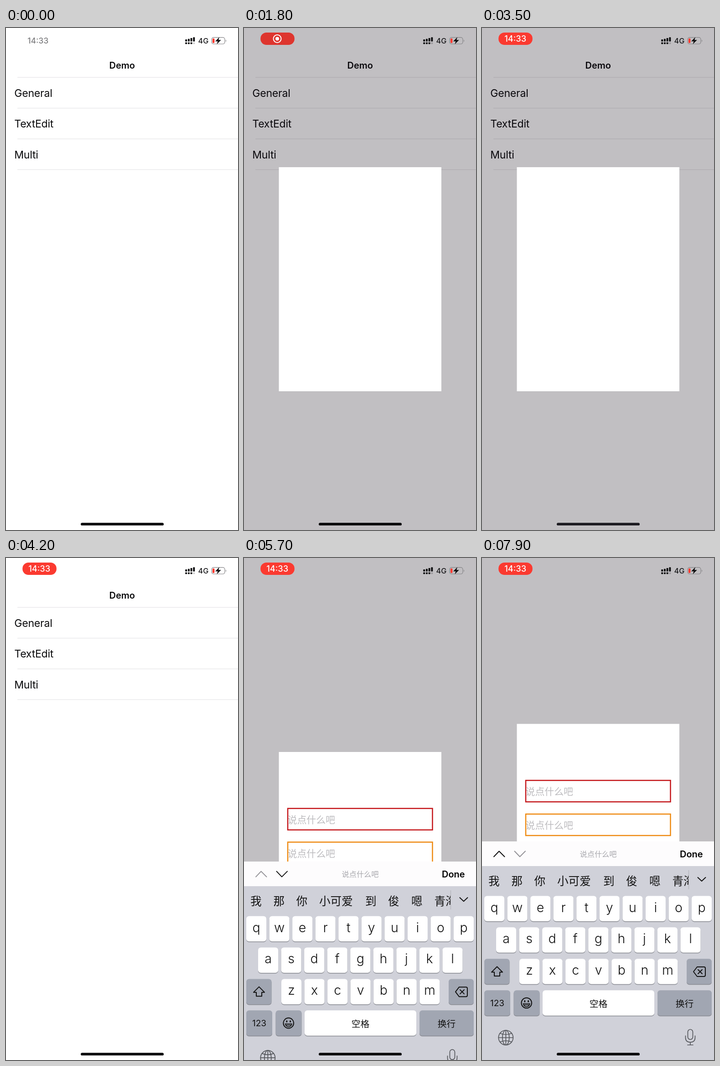
An HTML page that plays this animation: 509x1100 px, repeating every 8 s.

```html
<!DOCTYPE html>
<html lang="en">
<head>
<meta charset="utf-8">
<title>Popup demo</title>
<style>
html, body { margin: 0; width: 100%; height: 100%; overflow: hidden; background: #fff; }
svg { display: block; width: 509px; height: 1100px; font-family: Inter, Roboto, sans-serif; }
.cjk { font-family: "Noto Sans CJK SC", "Noto Sans CJK", sans-serif; }
.line { fill: none; stroke: #111; stroke-width: 2; stroke-linecap: round; stroke-linejoin: round; }
.mid { text-anchor: middle; }
</style>
</head>
<body>
<svg viewBox="0 0 509 1100" xmlns="http://www.w3.org/2000/svg">
  <defs><clipPath id="words"><rect x="0" y="676" width="454" height="60"/></clipPath></defs>
  <rect width="509" height="1100" fill="#fff"/>
  <rect id="mark" width="509" height="67.5" fill="#dbd9de"/>
  <g id="list" fill="#0b0b0d">
    <text class="mid" x="254.7" y="88.7" font-size="20" font-weight="600">Demo</text>
  </g>
  <rect id="dim" width="509" height="1100" fill="#0b030f"/>
  <g id="popup">
    <rect id="card" x="76.5" width="356.5" fill="#fff"/>
    <g id="fields"></g>
  </g>

  <g id="keyboard">
    <rect y="621" width="509" height="55" fill="#fdfcfd"/>
    <rect y="675" width="509" height="900" fill="#d0d1d9"/>
    <path id="prev" class="line" d="M26 654.5 L37.5 642.5 L49.5 654.5"/>
    <path id="next" class="line" d="M71.5 642.5 L83 654.5 L95 642.5"/>
    <text class="cjk mid" x="255" y="654.5" font-size="16.2" fill="#a7a7ac">说点什么吧</text>
    <text class="mid" x="459.3" y="656" font-size="20" font-weight="600">Done</text>
    <g id="hints" class="cjk" clip-path="url(#words)" font-size="24.6" fill="#111"></g>
    <path d="M453.5 684 V726" stroke="#b2b3bb" stroke-width="1.2"/>
    <path class="line" d="M473.5 700 L482 708 L490.5 700"/>
    <g id="keys"></g>
    <path class="line" d="M33 895.5 L45 907.5 H39 V916 H27 V907.5 H21 Z"/>
    <path class="line" d="M472 896 H487 Q490 896 490 899 V914 Q490 917 487 917 H472 L464 906.5 Z M474 902 L483 911 M483 902 L474 911"/>
    <circle class="line" cx="97.7" cy="975" r="11.3"/>
    <g fill="#111">
      <ellipse cx="93.8" cy="971.3" rx="1.5" ry="2.2"/><ellipse cx="101.6" cy="971.3" rx="1.5" ry="2.2"/>
    </g>
    <path class="line" style="stroke-width:1.5" d="M90.5 976.5 H105 Q103.5 983 97.7 983 Q92 983 90.5 976.5 Z M92 979.3 H103.5"/>
    <g class="line" style="stroke:#55575c;stroke-width:1.7">
      <circle cx="52.3" cy="1051" r="16"/><ellipse cx="52.3" cy="1051" rx="7.5" ry="16"/>
      <path d="M36.3 1051 H68.3 M52.3 1035 V1067 M39.5 1041.5 Q52.3 1047 65 1041.5 M39.5 1060.5 Q52.3 1055 65 1060.5"/>
      <rect x="451.5" y="1033" width="11" height="22" rx="5.5"/>
      <path d="M446.5 1047 V1051 Q446.5 1061 457 1061 Q467.5 1061 467.5 1051 V1047 M457 1061 V1067 M451 1067 H463"/>
    </g>
  </g>

  <text id="clock" class="mid" x="70.3" y="34.3" font-size="17.5" font-weight="500" fill="#7e7e80">14:33</text>
  <g id="pill">
    <rect id="pillBox" x="36.2" y="10" width="74.6" height="27" rx="13"/>
    <g id="rec">
      <circle cx="73" cy="23.5" r="8.5" fill="none" stroke="#fff" stroke-width="2"/>
      <circle cx="73" cy="23.5" r="4" fill="#fff"/>
    </g>
    <text id="pillTime" class="mid" x="73.2" y="30" font-size="18.3" font-weight="500" fill="#fff">14:33</text>
  </g>
  <g id="signal" fill="#0b0b0d"></g>
  <text x="421.5" y="34" font-size="16.3" font-weight="500" fill="#1a1a1c">4G</text>
  <rect x="451.3" y="20.7" width="28.7" height="14.3" rx="4.3" fill="none" stroke="#858487" stroke-width="1.2"/>
  <path d="M482 25.5 Q484.5 28 482 30.5 Z" fill="#858487"/>
  <rect x="453" y="22.7" width="4.5" height="10.3" rx="2" fill="#fb3a30"/>
  <path d="M468 20 L459 29.2 H464.5 L462.5 35.5 L471.8 26.3 H466.3 Z" fill="#0b0b0d"/>
  <rect id="home" x="164" y="1084.3" width="182" height="5.8" rx="2.9"/>
</svg>
<script>
const LOOP = 8000, STEP = 100;
const $ = id => document.getElementById(id);
const set = (id, name, v) => $(id).setAttribute(name, v);

function add(parent, tag, attrs, text) {
  const el = document.createElementNS("http://www.w3.org/2000/svg", tag);
  for (const k in attrs) el.setAttribute(k, attrs[k]);
  if (text) el.textContent = text;
  $(parent).appendChild(el);
}

function buildList() {
  ["General", "TextEdit", "Multi"].forEach((s, i) =>
    add("list", "text", { x: 18.3, y: 150.6 + 67.5 * i, "font-size": 23, "letter-spacing": -0.2 }, s));
  for (let i = 0; i < 4; i++)
    add("list", "rect", { x: 25, y: 107.6 + 67.4 * i, width: 484, height: 1.2, fill: "#e5e4e7" });
}

function buildFields() {
  ["#c4161a", "#ee8a12"].forEach((stroke, i) => {
    const y = 123.8 + 73.8 * i;
    add("fields", "text", { class: "cjk", x: 95.5, y: y + 32, "font-size": 20.9, "font-weight": 300, fill: "#bdbcbf" }, "说点什么吧");
    add("fields", "rect", { x: 96, y, width: 317.5, height: 47, fill: "none", stroke, "stroke-width": 2.5 });
  });
}

function key(x, y, w, label, size, opts = {}) {
  const box = { x, y, width: w, height: 55.5, rx: 6 };
  add("keys", "rect", { ...box, y: y + 1.5, fill: "#898b92" });
  add("keys", "rect", { ...box, fill: opts.dark ? "#a1a6b2" : "#fff" });
  if (label) add("keys", "text", {
    class: opts.cjk ? "cjk mid" : "mid", x: x + w / 2, y: y + (opts.base || 35),
    "font-size": size, "font-weight": opts.weight || 400, fill: "#111"
  }, label);
}

function buildKeyboard() {
  [["我", 14], ["那", 64.5], ["你", 114.5], ["小可爱", 165], ["到", 266], ["俊", 316], ["嗯", 367], ["青海", 417.5]]
    .forEach(([s, x]) => add("hints", "text", { x, y: 717.3 }, s));
  [["qwertyuiop", 5, 740.5], ["asdfghjkl", 31, 809.3], ["zxcvbnm", 82, 878.3]].forEach(([row, x, y]) =>
    [...row].forEach((c, i) => key(x + 50.56 * i, y, 44, c, 28.5, { weight: 350 })));
  key(5, 878.3, 55.5, "", 0, { dark: 1 });
  key(449, 878.3, 55, "", 0, { dark: 1 });
  key(5, 947.2, 57, "123", 19, { dark: 1 });
  key(69.5, 947.2, 57, "", 0, { dark: 1 });
  key(133, 947.2, 245, "空格", 19.8, { cjk: 1, base: 36.3 });
  key(385, 947.2, 119, "换行", 19.8, { cjk: 1, dark: 1, base: 36.3 });
}

function buildSignal() {
  [25, 23.8, 22, 20.3].forEach((top, i) => {
    const x = 393.3 + 5.7 * i;
    add("signal", "rect", { x, y: top, width: 3.9, height: 29.5 - top, rx: 0.8 });
    add("signal", "rect", { x, y: 31.5, width: 3.9, height: 3.7, rx: 0.8, opacity: i < 3 ? 1 : 0.2 });
  });
}

const span = (t, start, dur) => Math.min(1, Math.max(0, (t - start) / dur));
const out = (t, start, dur, n) => 1 - (1 - span(t, start, dur)) ** n;
const mix = (a, b, k) => a + (b - a) * k;

function draw(t) {
  // plain popup twice, then the popup with fields
  const edit = t >= 4300;
  const open = t < 2700 ? 980 : 2850, close = t < 2700 ? 2200 : 3700;
  let shown, dim, rest = 305;
  if (edit) {
    shown = out(t, 4420, 480, 2.565);
    dim = out(t, 4420, 180, 2.5);
    rest = mix(425, 363.5, out(t, 6500, 400, 2.5));
  } else {
    shown = out(t, open, 400, 2.4) - span(t, close, 300) ** 2;
    dim = out(t, open, 400, 2.2) - span(t, close, 300);
  }
  set("popup", "transform", `translate(0 ${mix(1100, rest, shown)})`);
  set("card", "height", edit ? 260 : 491);
  set("fields", "visibility", edit ? "visible" : "hidden");
  set("dim", "opacity", 0.25 * dim);

  const tap = edit ? 4420 : open;
  set("mark", "y", edit ? 175.8 : 108.3);
  set("mark", "opacity", t < tap ? 0 : 1 - span(t, tap + 140, 250));
  set("list", "opacity", 1 - span(t, 4550, 350));

  set("keyboard", "transform", `translate(0 ${479 * (1 - out(t, 5450, 450, 2.94))})`);
  const last = t >= 6500;
  $("prev").style.stroke = last ? "#111" : "#929196";
  $("next").style.stroke = last ? "#929196" : "#111";

  const swap = span(t, 2900, 300);
  set("clock", "opacity", 1 - span(t, 0, 300));
  set("pill", "opacity", span(t, 0, 400));
  set("rec", "opacity", 1 - swap);
  set("pillTime", "opacity", swap);
  set("pillBox", "fill", `rgb(${mix(222, 251, swap)},${mix(53, 58, swap)},${mix(46, 48, swap)})`);
  set("home", "fill", t >= 3200 && t < 3900 ? "#1d1b21" : "#050507");
}

buildList();
buildFields();
buildKeyboard();
buildSignal();

const began = performance.now();
function tick() {
  const t = (performance.now() - began) % LOOP;
  draw(Math.floor(t / STEP) * STEP);
  requestAnimationFrame(tick);
}
draw(0);
requestAnimationFrame(tick);
</script>
</body>
</html>
```
